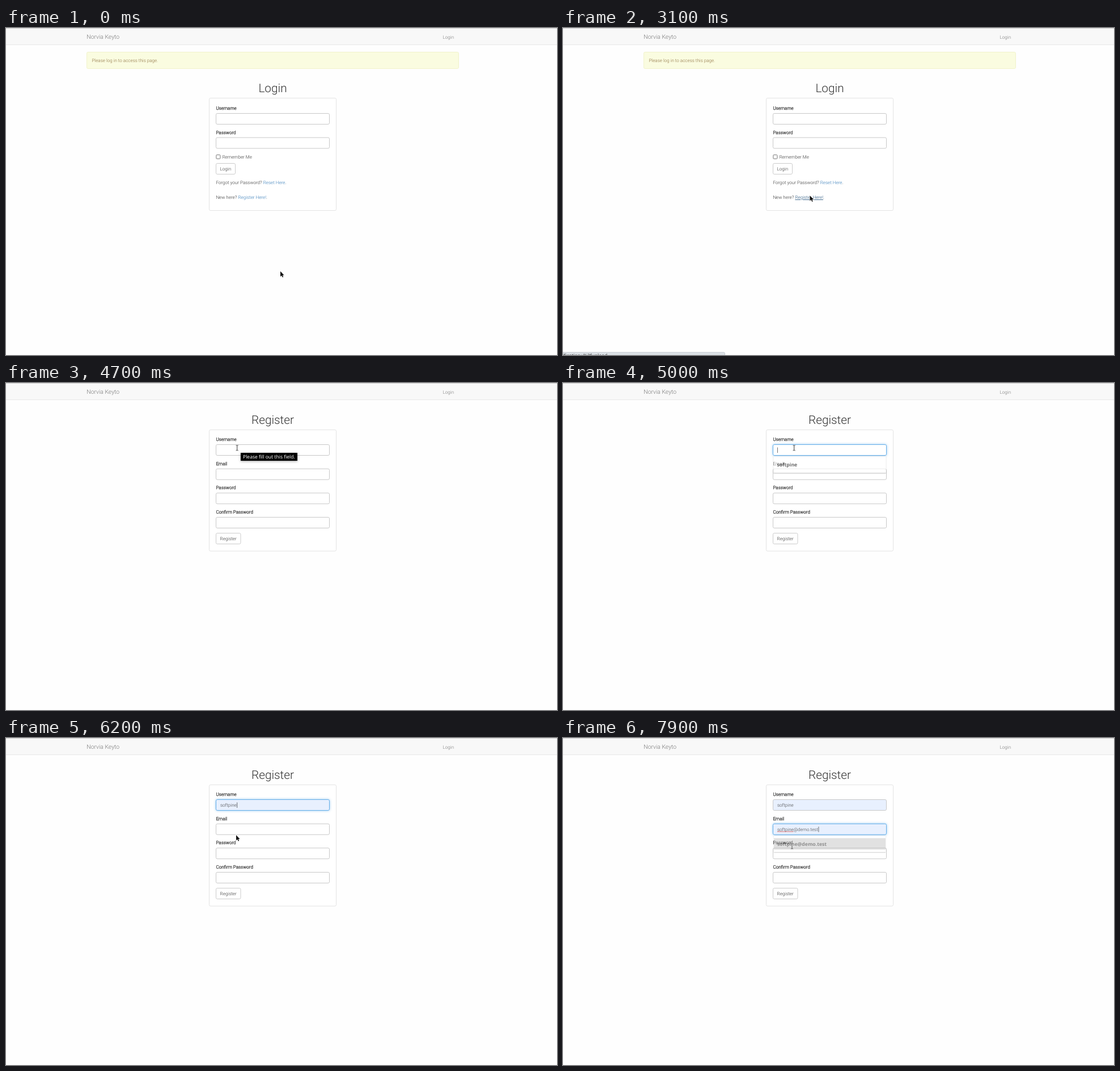
Animation of 972x576 px, one loop 8 s. Source, as an HTML page:

```html
<!DOCTYPE html>
<html lang="en">
<head>
<meta charset="utf-8">
<title>Register form demo</title>
<style>
  html, body { margin: 0; width: 100%; height: 100%; overflow: hidden; background: #fefefe; }
  svg { display: block; }
  text { font: 300 8.07px Roboto, sans-serif; fill: #333; text-rendering: geometricPrecision; white-space: pre; }
  .brand { font-size: 10.37px; }
  .nav { fill: #777; }
  .title { font-size: 20.75px; text-anchor: middle; }
  .label { stroke: #333; stroke-width: .3px; }
  .warn { fill: #8a6d3b; }
  .link { fill: #337ab7; }
  .hover { fill: #23527c; text-decoration: underline; }
  .value { fill: #444; }
  .preview { font: 7.68px "Liberation Sans", Arial, sans-serif; fill: #000; }
  .system { font: 8.5px "Noto Sans", sans-serif; }
  .item { font: 600 8.8px "Noto Sans", sans-serif; fill: #222; }
  .focus { filter: drop-shadow(0 0 2px rgba(102, 175, 233, .7)); }
  .tip { filter: drop-shadow(0 1px 2px rgba(0, 0, 0, .35)); }
  .popup { filter: drop-shadow(0 .5px 1px rgba(0, 0, 0, .25)); }
</style>
</head>
<body>
<svg id="stage" width="972" height="576" viewBox="0 0 972 576"></svg>
<script>
const stage = document.getElementById("stage");
const LOOP = 8000, STEP = 100;
const USER = "softpine", EMAIL = USER + "@demo.test";

// Pointer path: time, x, y of the hot spot
const PATH = [
  [0, 484, 428.5], [200, 482, 426.5], [300, 482, 426.5], [400, 482, 423],
  [500, 482, 423], [600, 479.5, 399], [1100, 479.5, 399], [1300, 462, 370],
  [1600, 438.3, 316], [1900, 436.5, 296], [2000, 436.5, 296], [2500, 435.5, 295.2],
  [3700, 435.5, 295.2], [3900, 429, 255], [4100, 414, 155], [4300, 407.7, 114.3],
  [5500, 407.7, 114.3], [5600, 407.5, 117.5], [5700, 407, 141], [6000, 407, 141],
  [6200, 406, 171], [6300, 406, 171], [6500, 404, 159.5], [7300, 404, 159.5],
  [7400, 404, 166], [7500, 404, 183], [7800, 404, 183], [7900, 404, 190.5]
];

const within = (t, from, to) => t >= from && t < to;
const ramp = (t, from, to) => Math.max(0, Math.min(1, (t - from) / (to - from)));

const text = (x, y, content, cls = "") => `<text x="${x}" y="${y}" class="${cls}">${content}</text>`;
const box = (x, y, w, h, fill, stroke = "none", rx = 0, cls = "") =>
  `<rect x="${x}" y="${y}" width="${w}" height="${h}" rx="${rx}" fill="${fill}" stroke="${stroke}" class="${cls}"/>`;
const link = (content, cls = "") => `<tspan class="link ${cls}">${content}</tspan>`;
const panel = (y, h) => box(358.5, y, 224, h, "#fff", "#e3e3e3", 2.3);
const button = (y, w, label) => box(370.5, y, w, 19, "#fff", "#ccc", 2.3) + text(377.6, y + 12.4, label);

function field(y, label, { focused, filled } = {}) {
  return text(370.4, y - 6.4, label, "label") +
    box(370.5, y, 200, 19, filled ? "#e8f0fe" : "#fff", focused ? "#66afe9" : "#c8c8c8", 2.3, focused ? "focus" : "");
}

function caret(x, y) {
  return box(x, y + 5, .7, 9.5, "#333");
}

function navbar() {
  return box(0, 0, 972, 29.5, "#f8f8f8") + box(0, 29, 972, 1, "#e7e7e7") + box(0, 0, 972, 1, "#cfcfcf") +
    text(142.3, 19.2, "Norvia Keyto", "brand nav") + text(770.6, 18.5, "Login", "nav");
}

function loginPage(t) {
  const hover = t >= 1800 ? "hover" : "";
  return box(142.5, 42.5, 656, 29, "#fafce0", "#f1f3cb", 2.3) +
    text(151.4, 60, "Please log in to access this page.", "warn") +
    text(470.5, 113, "Login", "title") + panel(123.5, 198) +
    field(150.5, "Username") + field(193, "Password") +
    box(370.9, 223.4, 7, 7, "#fff", "#777", 1.2) + text(381.7, 229.7, "Remember Me") +
    button(238.5, 34, "Login") +
    text(370.4, 275.1, `Forgot your Password? ${link("Reset Here")}.`) +
    text(370.4, 301, `New here? ${link("Register Here!", hover)}.`);
}

// Autofill list under a field: fades and scales while opening and closing
function popup(t, y, value, opens, hovers, closes) {
  const shown = ramp(t, opens - 100, opens + 200) * (1 - ramp(t, closes, closes + 300));
  if (!shown) return "";
  const scale = .96 + .04 * shown, cy = y + 35.5;
  return `<g opacity="${shown}" transform="translate(470.5 ${cy}) scale(${scale}) translate(-470.5 ${-cy})">` +
    box(370, y + 20.5, 201, 30, "#fff", "none", 0, "popup") +
    (t >= hovers ? box(370, y + 25, 201, 20.5, "#c4c4c4") : "") +
    box(370, y + 50, 201, 1, "#aaa") + text(376.2, y + 38.6, value, "item") + "</g>";
}

function registerPage(t) {
  const userFocus = within(t, 4800, 6600), mailFocus = t >= 6600;
  const userFilled = t >= 5600, mailFilled = t >= 7400;
  let out = text(470.5, 71.5, "Register", "title") + panel(82.5, 213.5) +
    field(108.5, "Username", { focused: userFocus, filled: userFilled }) +
    field(151.2, "Email", { focused: mailFocus, filled: mailFilled }) +
    field(193.8, "Password") + field(236.5, "Confirm Password") + button(264.5, 43.5, "Register");

  if (userFilled) out += text(378, 121.3, USER, t < 6000 ? "preview" : "value");
  if (mailFilled) out += text(378, 163.9, EMAIL, t < 7800 ? "preview" : "value");
  if (within(t, 4800, 5600)) out += caret(378, 108.5);
  if (within(t, 6000, 6600)) out += caret(407.4, 108.5);
  if (within(t, 6600, 7100)) out += caret(378, 151.2);
  if (t >= 7800) {
    out += caret(450.6, 151.2) +
      `<path d="M378 165H406.5" stroke="#e0403a" stroke-width=".9" stroke-dasharray="1.6 .5"/>`;
  }

  out += popup(t, 108.5, USER, 4900, 5600, 5900) + popup(t, 151.2, EMAIL, 6700, 7400, 7750);
  if (within(t, 4700, 4900)) {
    out += box(414, 123, 100, 14, "#000", "none", 0, "tip") +
      `<text x="418" y="133.1" class="system" style="fill:#fff">Please fill out this field.</text>`;
  }
  return out;
}

// Link preview at the bottom edge, widening after a short hover
function statusBar(t) {
  const shown = ramp(t, 2000, 2500) * (1 - ramp(t, 3700, 4100));
  if (!shown) return "";
  const width = t < 3100 ? 250 : 286;
  return `<g opacity="${shown}">` + box(-4, 571.3, width + 3.5, 12, "#dce1e6", "#c3c9cf", 2) +
    text(-1, 580.2, "ification=%2fupload", "system") + "</g>";
}

function pointer(t) {
  let i = PATH.findIndex(p => p[0] > t);
  if (i < 0) i = PATH.length;
  const a = PATH[i - 1], b = PATH[i] || a;
  const k = a === b ? 0 : ramp(t, a[0], b[0]);
  const x = a[1] + (b[1] - a[1]) * k, y = a[2] + (b[2] - a[2]) * k;
  const overText = within(t, 4200, 5600) || within(t, 6400, 7400) || t >= 7900;
  const beam = "M-2-4.6Q-.3-4.6 0-4Q.3-4.6 2-4.6M0-4V4M-2 4.6Q-.3 4.6 0 4Q.3 4.6 2 4.6";
  const arrow = "M0 0V9.4L2.2 7.4L3.8 10.8L5.3 10.1L3.8 6.9H6.6Z";
  return `<g transform="translate(${x} ${y})">` + (overText
    ? `<path d="${beam}" fill="none" stroke="#fff" stroke-width="2"/><path d="${beam}" fill="none" stroke="#222" stroke-width=".9"/>`
    : `<path d="${arrow}" fill="#111" stroke="#fff" stroke-width="1.2" paint-order="stroke"/>`) + "</g>";
}

let drawn = -1;
function frame() {
  const t = Math.floor(performance.now() % LOOP / STEP) * STEP;
  if (t !== drawn) {
    drawn = t;
    stage.innerHTML = navbar() + (t < 3500 ? loginPage(t) : registerPage(t)) + statusBar(t) + pointer(t);
  }
  requestAnimationFrame(frame);
}
frame();
</script>
</body>
</html>
```
